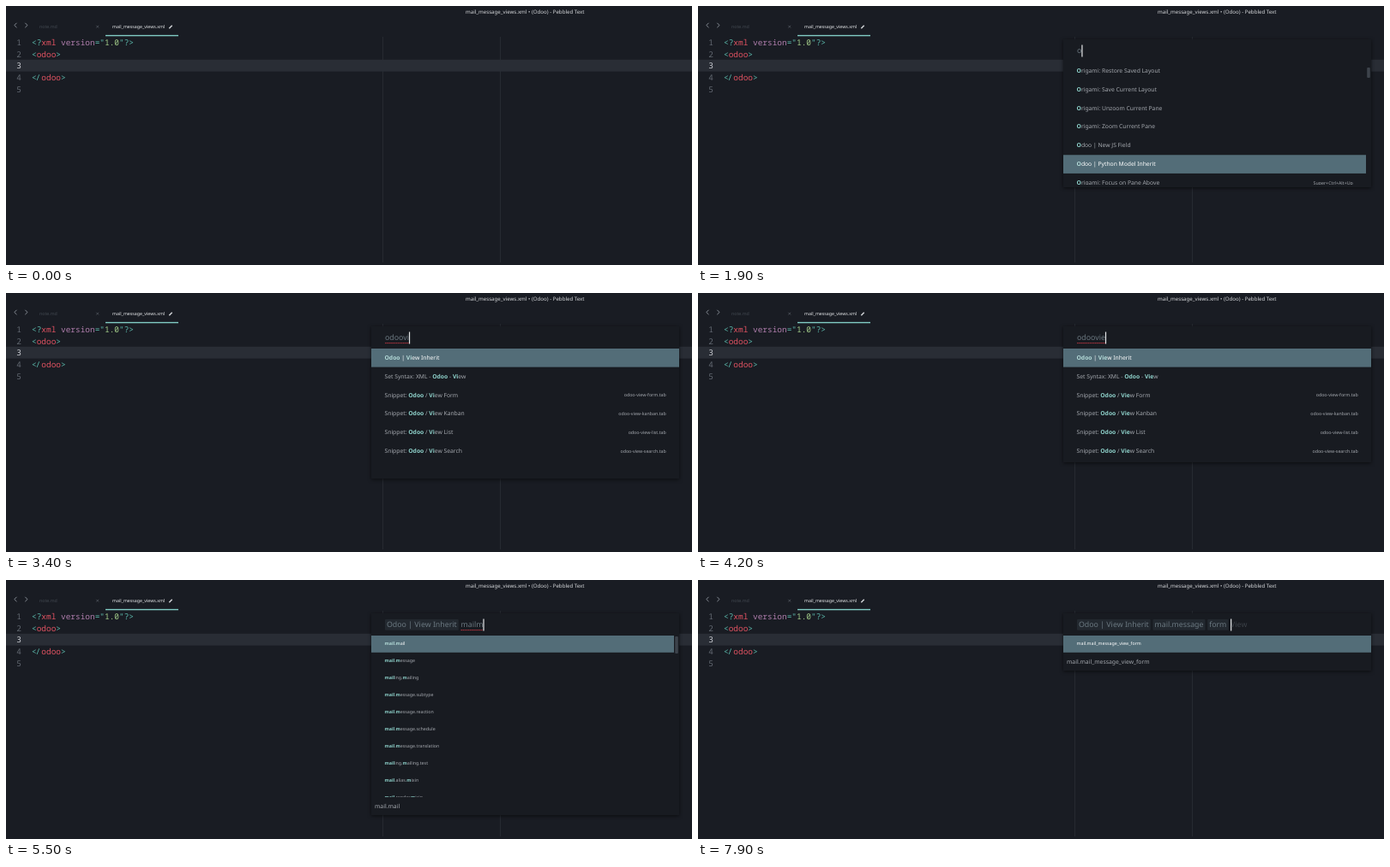
These frames come from a looping animation (800x303 px, 8 s). An HTML page:

```html
<!DOCTYPE html>
<html lang="en">
<head>
<meta charset="utf-8">
<title>Editor command palette</title>
<style>
html, body { margin: 0; width: 100%; height: 100%; overflow: hidden; background: #191c23; }
svg { display: block; width: 800px; height: 303px; }
text { font-family: "Noto Sans", sans-serif; white-space: pre; text-rendering: geometricPrecision; }
.code text { font: 9.45px "Noto Sans Mono", monospace; }
.num { fill: #626871; text-anchor: end; }
.p { fill: #5dbcae; } .tag { fill: #df5261; } .attr { fill: #b17fae; } .str { fill: #a3cd8a; }
.small { font-size: 5.25px; }
.row { fill: #a4a8ae; font-size: 6.75px; }
.key { fill: #a4a8ae; font-size: 5.3px; text-anchor: end; }
.model { font-size: 5.3px; }
.hit { fill: #8fd3cc; font-weight: 700; }
.sel { fill: #fff; }
.sel .hit { fill: #b5dcd9; }
.input { fill: #6b7880; font-size: 8.8px; }
.hint { fill: #3b4148; }
.foot { fill: #a4a8ae; font-size: 6.8px; }
.shadow { filter: drop-shadow(0 1px 2px #0009); }
</style>
</head>
<body>
<svg viewBox="0 0 800 303">
  <path d="M439.5 36V300M576.5 36V300" stroke="#262a31"/>
  <rect y="62.8" width="800" height="13.8" fill="#292d35"/>
  <rect id="glow" y="62.8" width="800" height="13.8" fill="#fff"/>
  <text x="536" y="9.3" fill="#d5d7da" font-size="6.13">mail_message_views.xml • (Odoo) - Pebbled Text</text>
  <path d="M12.5 19.8L9.8 22.5L12.5 25.2M22.3 19.8L25 22.5L22.3 25.2" fill="none" stroke="#858b94"/>
  <text class="small" x="39" y="26" fill="#434951">note.md</text>
  <path d="M105.3 22.8l2.8 2.8m0-2.8l-2.8 2.8" stroke="#5b6169" stroke-width=".7"/>
  <text class="small" x="124" y="26" fill="#e8eaec">mail_message_views.xml</text>
  <path d="M190.3 26.2l3.4-3.4" stroke="#d0d3d7" stroke-width="1.5"/>
  <rect x="116" y="33.9" width="85" height="1.4" fill="#80cbc4"/>
  <g class="code">
    <g id="nums"></g>
    <text class="p" x="30" y="46">&lt;?<tspan class="tag">xml</tspan><tspan class="attr"> version</tspan>="<tspan class="str">1.0</tspan>"?&gt;</text>
    <text class="p" x="30" y="59.7">&lt;<tspan class="tag">odoo</tspan>&gt;</text>
    <text class="p" x="30" y="87.1">&lt;<tspan dx="-1.2">/</tspan><tspan class="tag" dx="1.2">odoo</tspan>&gt;</text>
  </g>
  <rect id="caret" x="52.3" y="62" width="1.2" height="15.5" fill="#eceef0"/>
  <g id="panel"></g>
</svg>
<script>
const $ = id => document.getElementById(id);
const ctx = document.createElement('canvas').getContext('2d');
const width = s => {
  ctx.font = '8.8px "Noto Sans", sans-serif';
  return ctx.measureText(s).width;
};
const rect = (x, y, w, h, fill, more = '') =>
  `<rect x="${x}" y="${y}" width="${w}" height="${h}" fill="${fill}" ${more}/>`;
const text = (x, y, cls, s) => `<text x="${x}" y="${y}" class="${cls}">${s}</text>`;

$('nums').innerHTML = [1, 2, 3, 4, 5].map(n =>
  `<text class="num" x="18" y="${32.3 + 13.7 * n}" ${n == 3 ? 'style="fill:#c9ccd1"' : ''}>${n}</text>`).join('');

// Lists; a shortcut follows "@"
const recent = ['Origami: Restore Saved Layout', 'Origami: Save Current Layout', 'Origami: Unzoom Current Pane',
  'Origami: Zoom Current Pane', 'Odoo | New JS Field', 'Odoo | Python Model Inherit',
  'Origami: Focus on Pane Above@Super+Ctrl+Alt+Up'];
const sides = [['on the Left', 'Left'], ['on the Right', 'Right'], ['Above', 'Up'], ['Below', 'Down']];
const commands = ['Odoo | Python Model Inherit',
  ...['', ' - View', ' - OWL'].map(s => 'Set Syntax: XML - Odoo' + s),
  ...sides.map(([s, k]) => `Origami: Destroy Pane ${s}@Ctrl+K, Ctrl+Shift+${k}`),
  ...['Form', 'Kanban', 'List', 'Search'].map(s => `Snippet: Odoo / View ${s}@odoo-view-${s.toLowerCase()}.tab`)];
const inherit = ['Odoo | View Inherit', ...commands];
const mail = ['mail.mail', 'mail.message', 'mailing.mailing',
  ...['subtype', 'reaction', 'schedule', 'translation'].map(s => 'mail.message.' + s),
  'mailing.mailing.test', 'mail.alias.mixin', 'mail.render.mixin'];
const models = [...['account', 'account.tag', 'group', 'journal', 'move', 'move.line', 'payment',
  'payment.term', 'tax', 'tax.group'].map(s => 'account.' + s), ...mail];
const types = ['form', 'list', 'kanban', 'search', 'calendar', 'pivot', 'graph', 'activity', 'gantt', 'map'];
const views = ['mail.mail_message_view_form'];

const chips = ['Odoo | View Inherit', 'mail.message', 'form'];
const hints = ['', 'Model', 'Type', 'View'];

// Start, number of chips, query, list, selected row, scroll thumb
const steps = [
  [1800, 0, '', recent, 5, [72, 12]], [1900, 0, 'o', recent, 5, [72, 12]],
  [2000, 0, 'od', commands, 0, [67, 30]], [2100, 0, 'odo', commands, 0, [72, 45]],
  [2200, 0, 'odoo', commands, 0, [80, 58]],
  [3100, 0, 'odoov', inherit, 0], [3300, 0, 'odoovi', inherit, 0], [3500, 0, 'odoovie', inherit, 0],
  [4300, 1, '', models, 0, [66, 8]], [4800, 1, 'm', models, 0, [66, 9]], [4900, 1, 'ma', models, 0, [66, 12]],
  [5100, 1, 'mai', mail, 0, [66, 16]], [5200, 1, 'mail', mail, 0, [66, 16]],
  [5400, 1, 'mailm', mail, 0, [66, 20]], [6100, 1, 'mailm', mail, 1, [66, 20]],
  [6300, 2, '', types, 0], [7000, 2, 'f', types, 0], [7100, 2, 'fo', types, 0],
  [7200, 2, 'for', types, 0], [7300, 2, 'form', types, 0], [7400, 3, '', views, 0]];

// Panel bottom over time
const bottoms = [[1800, 189], [1900, 212], [2200, 275], [3100, 275], [3500, 198], [4200, 198],
  [4500, 275], [6900, 275], [7300, 106], [8000, 106]];
const bottomAt = t => {
  const i = bottoms.findIndex(b => b[0] > t);
  const [t0, a] = bottoms[i - 1], [t1, b] = bottoms[i];
  return a + (b - a) * (t - t0) / (t1 - t0);
};

// Marks the query's letters in order; null if they are not all there
function match(s, query) {
  let i = 0;
  const out = [...s].map(c =>
    i < query.length && c.toLowerCase() == query[i] ? (i++, `<tspan class="hit">${c}</tspan>`) : c).join('');
  return i == query.length ? out.replaceAll('</tspan><tspan class="hit">', '') : null;
}

function panel(t) {
  const [, stage, query, list, sel, thumb] = steps.findLast(s => s[0] <= t);
  const bottom = bottomAt(t), pitch = stage ? 20 : 21.85;
  const listEnd = bottom - (stage ? 21 : 3);
  const right = thumb ? 779 : 785;
  const shown = list.map(s => s.split('@')).filter(([s]) => match(s, query) !== null);

  let out = rect(426, 39, 359, bottom - 39, '#181b21', 'class="shadow"');
  let x = 442;
  for (const chip of chips.slice(0, stage)) {
    const w = width(chip);
    out += rect(x, 46, w + 4, 12.8, '#232930', 'rx="1"') + text(x + 2, 55.3, 'input', chip);
    x += w + 6.7;
  }
  const end = x + width(query);
  out += text(x, 55.3, 'input' + (query ? '' : ' hint'), query || hints[stage]);
  if (query.length > 4)
    out += `<path d="M${x} 58.6H${end}" stroke="#b0343f" stroke-dasharray="1.6 .5"/>`;
  else if (query == 'odoo') out += rect(x, 58.2, 5.5, .8, '#77737a');

  out += `<clipPath id="clip"><rect x="426" y="65" width="359" height="${Math.max(0, listEnd - 65)}"/></clipPath><g clip-path="url(#clip)">`;
  shown.forEach(([s, key], i) => {
    const y = 65 + i * pitch, base = y + (stage ? 11.4 : 12.9);
    if (i == sel) out += rect(426, y, right - 426, pitch - .2, '#536d78');
    out += text(441.5, base, 'row' + (stage ? ' model' : '') + (i == sel ? ' sel' : ''), match(s, query));
    if (key) out += text(right - 15.2, base - .3, 'key', key);
  });
  out += '</g>';
  if (thumb) out += rect(780.2, thumb[0], 3.6, thumb[1], '#3d434b', 'rx="1"');
  if (stage) out += text(430, bottom - 8.3, 'foot', shown[sel][0]);
  return out + rect(end, 45.5, 1.2, 14, '#e4e6e8');
}

let last = -1;
function draw(now) {
  const t = Math.floor(now % 8000 / 100) * 100;
  if (t != last) {
    last = t;
    const open = t >= 1800;
    const blink = open ? 0 : Math.sin(Math.PI * t / 1060) ** 2;
    $('caret').setAttribute('opacity', blink);
    $('glow').setAttribute('opacity', blink * .025);
    $('panel').innerHTML = open ? panel(t) : '';
  }
  requestAnimationFrame(draw);
}
requestAnimationFrame(draw);
</script>
</body>
</html>
```
